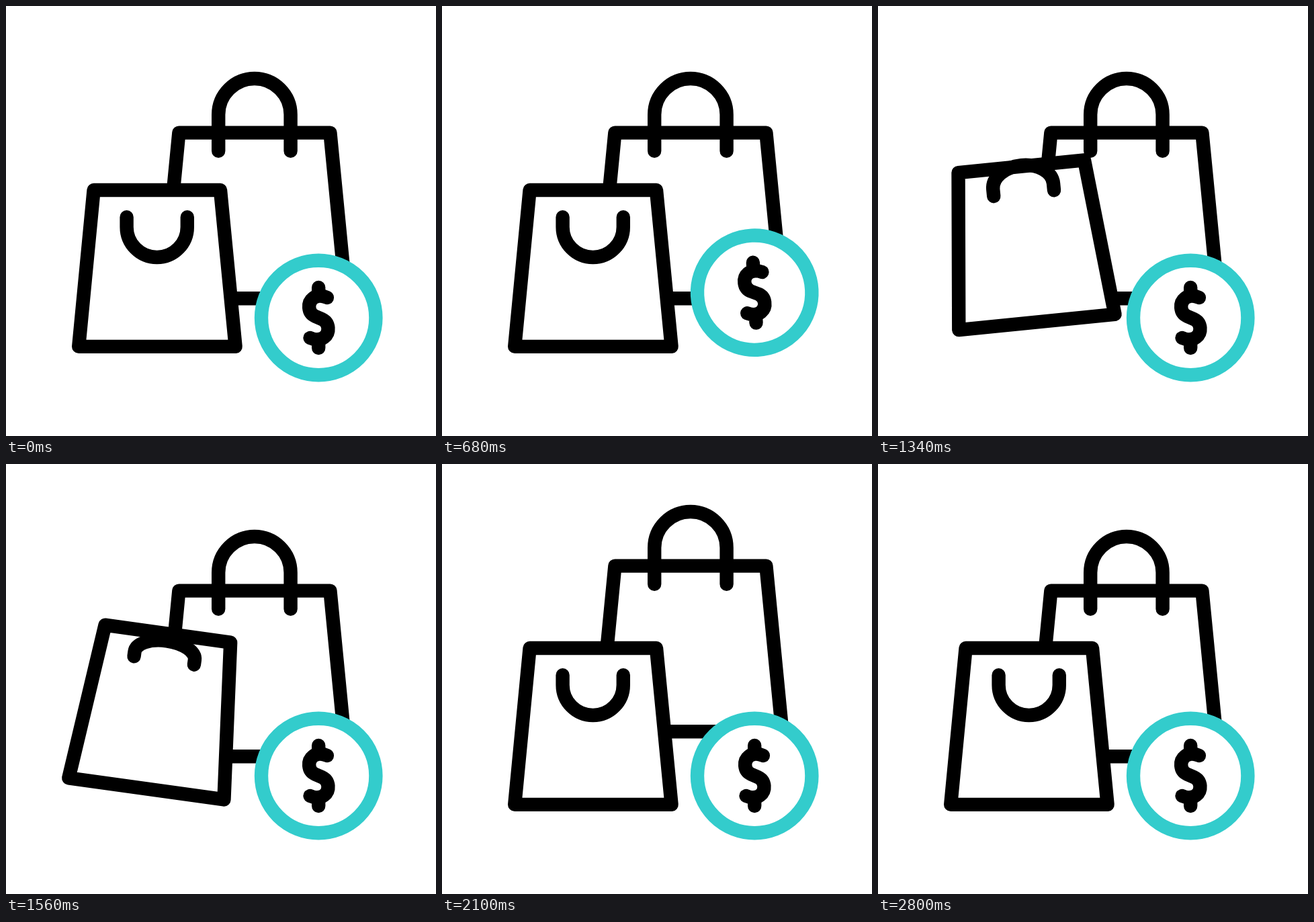
Write an HTML page with a canvas that moves like this. It is 640 px wide and 640 px high and loops after 2.82 s.

```html
<!DOCTYPE html>
<html lang="en">
<head>
<meta charset="utf-8">
<title>Shopping bags</title>
<style>
  html, body { margin: 0; width: 100%; height: 100%; overflow: hidden; background: #fff; }
  canvas { display: block; width: 640px; height: 640px; }
</style>
</head>
<body>
<canvas id="stage" width="640" height="640"></canvas>
<script>
const ctx = document.getElementById('stage').getContext('2d');
const LOOP = 2820;
const LINE = 20.4;
const BLACK = '#000';
const TEAL = '#33cccc';

const DOLLAR = new Path2D(
  'M478 434C471 430.8 463 430.4 457.2 434.8C448.2 441.6 449.2 456.5 459.8 461.6' +
  'L470.8 466.4C481.4 471.5 482.4 486.4 473.4 493.2C467.6 497.6 459.6 497.2 452.6 494' +
  'M465.2 419V432M465.2 496V509');

// Eased value at time t from [time, value] keys.
function track(keys, t) {
  if (t <= keys[0][0]) return keys[0][1];
  for (let i = 1; i < keys.length; i++) {
    const [t0, a] = keys[i - 1], [t1, b] = keys[i];
    if (t < t1) {
      const x = (t - t0) / (t1 - t0);
      return a + (b - a) * x * x * (3 - 2 * x);
    }
  }
  return keys[keys.length - 1][1];
}

const lift = (t, height) => track([[0, 0], [400, -height], [1200, 0]], t);
const swing = t => track([[200, 0], [400, 10], [600, -10], [800, 10], [1000, 0]], t);
const flip = t => track([[200, 1], [600, -0.81], [1200, 1]], t);

// Draws a part lifted and swung around its own centre.
function hop(t, height, cx, cy, draw) {
  ctx.save();
  ctx.translate(cx, cy + lift(t, height));
  ctx.rotate(swing(t) * Math.PI / 180);
  ctx.translate(-cx, -cy);
  draw(t);
  ctx.restore();
}

function body(topL, topR, top, botL, botR, bottom) {
  ctx.beginPath();
  ctx.moveTo(topL, top);
  ctx.lineTo(topR, top);
  ctx.lineTo(botR, bottom);
  ctx.lineTo(botL, bottom);
  ctx.closePath();
  ctx.fill();
  ctx.stroke();
}

// U-shaped handle; a negative stretch turns it upside down.
function handle(cx, y, r, stem, stretch) {
  ctx.beginPath();
  ctx.save();
  ctx.translate(cx, y);
  ctx.scale(1, stretch || 0.001);
  ctx.moveTo(-r, 0);
  ctx.lineTo(-r, stem);
  ctx.arc(0, stem, r, Math.PI, 0, true);
  ctx.lineTo(r, 0);
  ctx.restore();
  ctx.stroke();
}

function backBag() {
  body(257.4, 482.4, 188.6, 233.4, 506.4, 435.2);
  handle(369.9, 215.8, 53.7, 54.1, -1);
}

function frontBag(t) {
  body(130.6, 319, 274, 108.2, 341.6, 506.9);
  handle(224.7, 314.2, 45.1, 14.7, flip(t));
}

function coin() {
  ctx.beginPath();
  ctx.arc(465.2, 464, 85.2, 0, Math.PI * 2);
  ctx.fill();
  ctx.strokeStyle = TEAL;
  ctx.stroke();
  ctx.strokeStyle = BLACK;
  ctx.stroke(DOLLAR);
}

function render(now) {
  const t = now % LOOP;
  ctx.fillStyle = '#fff';
  ctx.fillRect(0, 0, 640, 640);
  ctx.lineWidth = LINE;
  ctx.lineCap = ctx.lineJoin = 'round';
  ctx.strokeStyle = BLACK;
  hop(t - 1600, 38.6, 369.9, 270.5, backBag);
  hop(t - 800, 39, 224.8, 390.5, frontBag);
  hop(t, 52, 465.2, 464, coin);
}

let start;
function tick(now) {
  if (start === undefined) start = now;
  render(now - start);
  requestAnimationFrame(tick);
}
render(0);
requestAnimationFrame(tick);
</script>
</body>
</html>
```
